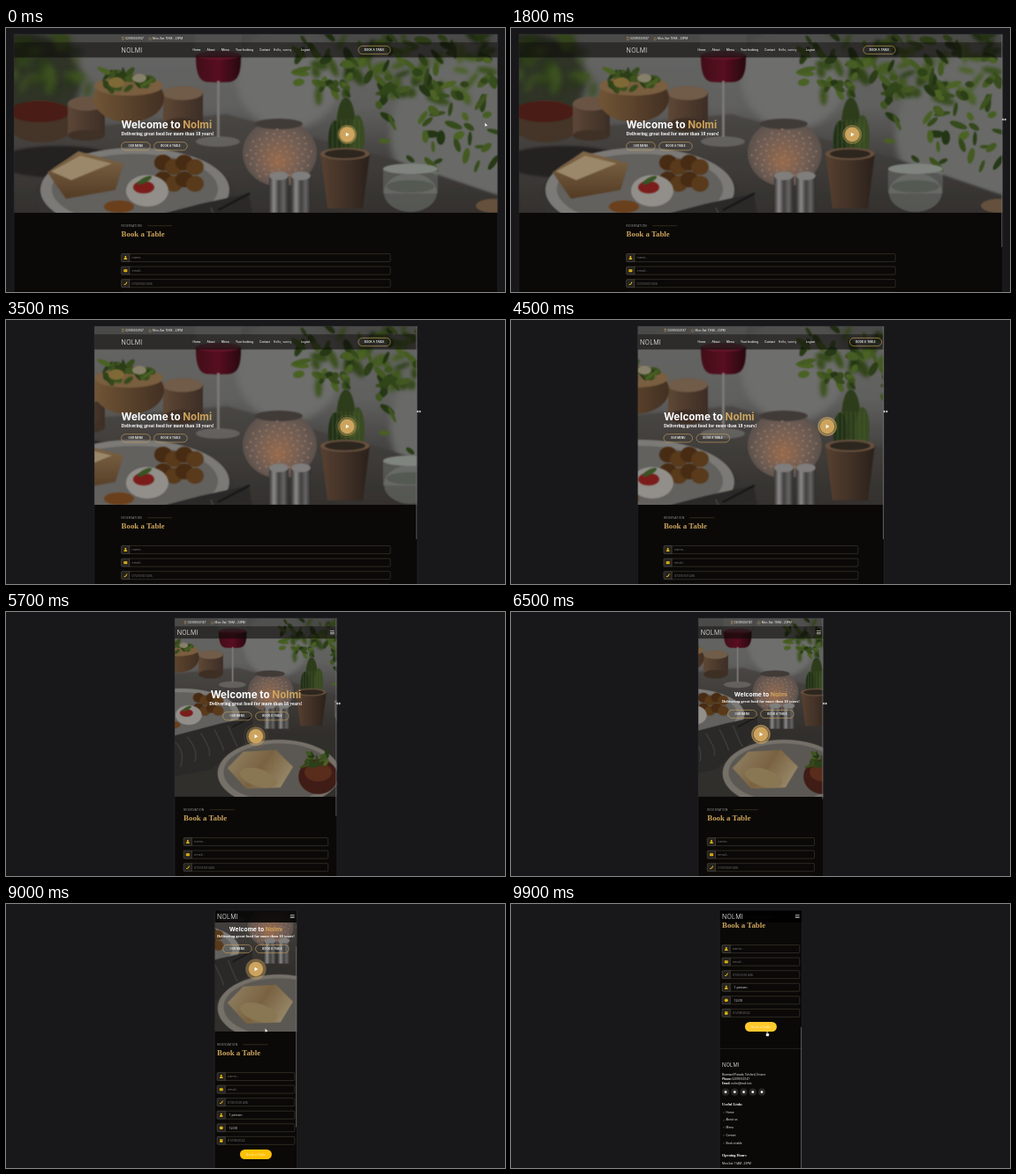
Recreate the animation shown at these times as an HTML page with a canvas. Size 565x300 px, loop 10 s.

```html
<!DOCTYPE html>
<html lang="en">
<head>
<meta charset="utf-8">
<title>Responsive restaurant page</title>
<style>
html, body { margin: 0; width: 100%; height: 100%; overflow: hidden; background: #18181b; }
canvas { display: block; width: 565px; height: 300px; }
</style>
</head>
<body>
<canvas id="stage"></canvas>
<script>
const W = 565, H = 300, LOOP = 10000, STEP = 100;
const PX = 0.235;              // stage pixels per page pixel
const CX = 282.9, TOP = 7, FOLD = 210, VIEW_H = 326;
const GOLD = '#cda45e', YELLOW = '#f5c211', DARK = '#0a0907';
const SANS = 'Inter, sans-serif', OPEN = '"Open Sans", sans-serif';
const SERIF = '"Liberation Serif", serif';
const NAME = 'Nolmi', HOURS = 'Mon-Sat: 11AM - 23PM', PHONE = '02095550147';

const canvas = document.getElementById('stage');
const dpr = window.devicePixelRatio || 1;
canvas.width = W * dpr;
canvas.height = H * dpr;
const ctx = canvas.getContext('2d');

function track(t, keys) {
  if (t <= keys[0][0]) return keys[0][1];
  for (let i = 1; i < keys.length; i++) {
    const [t0, a] = keys[i - 1], [t1, b] = keys[i];
    if (t <= t1) return a + (b - a) * (t - t0) / (t1 - t0);
  }
  return keys[keys.length - 1][1];
}

function random(seed) {
  return () => (seed = (seed * 16807) % 2147483647) / 2147483647;
}

// ---- basic shapes ----
function ellipse(c, x, y, rx, ry, fill, turn = 0) {
  c.fillStyle = fill;
  c.beginPath();
  c.ellipse(x, y, rx, ry, turn, 0, 7);
  c.fill();
}

function rect(x, y, w, h, fill) {
  ctx.fillStyle = fill;
  ctx.fillRect(x, y, w, h);
}

function box(x, y, w, h, r, stroke, fill, lw = 0.5) {
  ctx.beginPath();
  ctx.roundRect(x, y, w, h, r);
  if (fill) { ctx.fillStyle = fill; ctx.fill(); }
  if (stroke) { ctx.strokeStyle = stroke; ctx.lineWidth = lw; ctx.stroke(); }
}

function poly(c, points, fill) {
  c.fillStyle = fill;
  c.beginPath();
  points.forEach(([x, y]) => c.lineTo(x, y));
  c.fill();
}

function setFont(size, o) {
  ctx.font = `${o.weight || 400} ${size}px ${o.font || SANS}`;
  ctx.letterSpacing = (o.gap || 0) + 'px';
}

function text(s, x, y, size, o = {}) {
  setFont(size, o);
  ctx.fillStyle = o.color || '#fff';
  ctx.textAlign = o.align || 'left';
  ctx.fillText(s, x, y + size * 0.36);
  return ctx.measureText(s).width;
}

// ---- hero photo, reduced to soft shapes ----
const PHOTO_W = 548, PHOTO_H = 328;
const photo = makePhoto();

function makePhoto() {
  const cv = document.createElement('canvas'), k = 2;
  cv.width = PHOTO_W * k;
  cv.height = PHOTO_H * k;
  const c = cv.getContext('2d');
  c.scale(k, k);
  c.translate(-9, -TOP);
  const rnd = random(77);
  const e = (...a) => ellipse(c, ...a);
  const grad = (x0, y0, x1, y1, ...cols) => {
    const g = c.createLinearGradient(x0, y0, x1, y1);
    cols.forEach((col, i) => g.addColorStop(i / (cols.length - 1), col));
    return g;
  };
  const blur = n => { c.filter = n ? `blur(${n * k}px)` : 'none'; };
  const leaves = (n, x, y, w, h, size) => {
    for (let i = 0; i < n; i++) {
      const v = rnd();
      e(x + rnd() * w, y + rnd() * h, size * (0.6 + rnd()), size * (0.3 + rnd() * 0.4),
        `rgb(${38 + v * 48},${58 + v * 55},${22 + v * 20})`, rnd() * 3);
    }
  };

  c.fillStyle = grad(0, 7, 0, 335, '#747473', '#6d6d6b', '#403d3b', '#292725', '#242220');
  c.fillRect(0, 0, 600, 340);
  blur(4);
  e(320, 55, 60, 60, '#7d7d7c');
  e(515, 120, 80, 85, '#777975');
  e(20, 60, 65, 55, '#353b2c');
  leaves(30, 9, 7, 85, 65, 8);
  blur(2);
  leaves(42, 350, 7, 200, 75, 9);
  blur(0.8);
  leaves(75, 330, 7, 225, 70, 7);
  leaves(44, 420, 60, 135, 100, 7);
  blur(1.2);
  poly(c, [[9, 120], [250, 98], [440, 150], [557, 190], [557, 335], [9, 335]], grad(0, 100, 0, 220, '#53504d', '#383532'));
  e(60, 152, 70, 18, '#292725');

  // wooden bowls
  blur(0.7);
  e(40, 106, 40, 24, '#4f3c2d');
  e(38, 95, 34, 12, '#542019');
  c.fillStyle = grad(68, 0, 112, 0, '#6b5140', '#45352a');
  c.fillRect(70, 86, 42, 36);
  e(91, 86, 21, 8, '#78604d');
  e(91, 122, 21, 6, '#49382b');
  c.fillStyle = grad(178, 0, 224, 0, '#6b513c', '#44332a');
  c.fillRect(178, 74, 45, 36);
  e(200, 110, 22, 8, '#47362a');
  e(200, 74, 23, 8, '#806853');
  e(139, 80, 40, 27, grad(100, 0, 178, 0, '#80603d', '#4c3727'));
  e(139, 66, 39, 11, '#8a6b48');
  leaves(24, 112, 49, 52, 20, 6);
  e(125, 62, 9, 6, '#91783e');
  e(151, 57, 8, 5, '#999177');

  // wine glass
  c.fillStyle = grad(215, 0, 266, 0, '#4a101c', '#641024', '#2d0912');
  c.beginPath();
  c.moveTo(215, 31);
  c.bezierCurveTo(215, 68, 228, 60, 239, 62);
  c.bezierCurveTo(253, 60, 267, 68, 266, 31);
  c.fill();
  e(240.5, 31, 25.5, 5, '#701a30');
  c.fillStyle = 'rgba(150,150,150,.28)';
  c.fillRect(214, 7, 53, 25);
  c.fillStyle = '#8b8785';
  c.fillRect(239, 60, 3, 64);
  e(240, 129, 25, 6, 'rgba(150,147,144,.5)');

  // lantern
  const lamp = c.createRadialGradient(308, 153, 3, 310, 141, 44);
  lamp.addColorStop(0, '#a97858');
  lamp.addColorStop(0.55, '#816b60');
  lamp.addColorStop(1, '#655b56');
  e(310, 142, 42, 38, lamp);
  e(309, 109, 27, 6, '#4a4340');
  for (let i = 0; i < 75; i++) {
    const a = i * 2.4, r = Math.sqrt(i / 75);
    e(310 + Math.cos(a) * 38 * r, 145 + Math.sin(a) * 31 * r, 1.2, 1, '#b58e72');
  }

  // cactus
  e(385, 114, 11, 35, '#33451f');
  e(373, 128, 8, 23, '#26381b');
  e(398, 124, 8, 25, '#405527');
  c.strokeStyle = '#5a6b3a';
  c.lineWidth = 0.7;
  for (let x = 370; x < 404; x += 5) {
    c.beginPath();
    c.moveTo(x, 104);
    c.lineTo(x, 146);
    c.stroke();
  }
  poly(c, [[356, 143], [412, 143], [404, 205], [364, 205]], grad(356, 0, 412, 0, '#634a38', '#4b382c', '#30251e'));
  e(384, 143, 28, 7, '#765c47');
  e(384, 143, 23, 5, '#332b22');

  // water glass
  e(458, 187, 30, 22, 'rgba(130,135,130,.55)');
  c.fillStyle = 'rgba(145,150,145,.4)';
  c.fillRect(427, 160, 62, 28);
  e(458, 160, 31, 6, '#929690');
  e(458, 180, 27, 7, '#60655d');
  e(552, 202, 20, 8, '#735b45');

  // plate with pastry, rice and croquettes
  e(146, 192, 112, 54, '#3d3b39');
  e(146, 184, 107, 48, '#8d8b87');
  e(146, 183, 94, 40, '#706e6b');
  poly(c, [[47, 164], [82, 140], [133, 154], [124, 184], [68, 194]], grad(0, 140, 0, 195, '#927653', '#5d4228'));
  poly(c, [[51, 163], [84, 145], [120, 154], [74, 173]], '#b09a78');
  for (let i = 0; i < 8; i++)
    e(178 + (i % 4) * 12, 153 + Math.floor(i / 4) * 19 + (i % 2) * 5, 10, 9, i % 2 ? '#65421f' : '#513116');
  e(160, 185, 24, 18, '#a6a39d');
  e(156, 181, 12, 7, '#8b211e');
  e(157, 173, 9, 3, '#405e29', -0.5);
  e(128, 203, 17, 7, '#79481f');
  for (let x = 298; x < 340; x += 25) {
    c.fillStyle = grad(x, 0, x + 22, 0, '#3c3b3b', '#a09e9c', '#4a4949', '#757371', '#333');
    c.fillRect(x, 168, 22, 42);
    e(x + 11, 168, 11, 5, '#918f8d');
  }

  // cloth, second plate
  poly(c, [[125, 225], [220, 200], [275, 188], [280, 222], [200, 285], [120, 300]], '#302f2e');
  c.strokeStyle = '#4b4948';
  c.lineWidth = 2;
  for (let i = 0; i < 5; i++) {
    c.beginPath();
    c.moveTo(132 + i * 25, 232 - i * 7);
    c.quadraticCurveTo(155 + i * 24, 250, 145 + i * 26, 280 - i * 10);
    c.stroke();
  }
  c.strokeStyle = '#171717';
  c.beginPath();
  c.moveTo(240, 207);
  c.lineTo(276, 188);
  c.stroke();
  e(325, 292, 112, 62, '#858078');
  e(325, 290, 101, 53, '#68645e');
  poly(c, [[231, 282], [260, 252], [320, 249], [351, 280], [328, 318], [265, 320]], grad(240, 250, 340, 320, '#a39170', '#8a704a', '#b1a17e'));
  e(288, 300, 35, 16, '#9c875f', 0.3);
  e(397, 298, 36, 32, '#482019');
  e(397, 290, 25, 17, '#65321f');
  leaves(24, 370, 255, 45, 23, 7);
  blur(0);
  return cv;
}

// ---- page parts ----
function layout(left) {
  const w = 2 * (CX - left);
  const rule = [[1400, 1320], [1200, 1140], [992, 960], [768, 720], [576, 540]]
    .find(([min]) => w >= min * PX);
  const outer = rule ? rule[1] * PX : w;
  return {
    left, right: left + w, w, outer,
    x: CX - outer / 2 + 12 * PX, cw: outer - 24 * PX,
    wide: w >= 992 * PX, tablet: w >= 768 * PX, fixedPhoto: w >= 1024 * PX
  };
}

function pill(x, y, w, h, label, fill) {
  box(x, y, w, h, h / 2, GOLD, fill, 0.6);
  text(label, x + w / 2, y + h / 2, 2.9, { weight: 600, align: 'center', gap: 0.12 });
}

function playButton(x, y, t) {
  ellipse(ctx, x, y, 11, 11, 'rgba(205,164,94,.42)');
  ellipse(ctx, x, y, 8.2, 8.2, GOLD);
  const p = (t % 2000) / 2000;
  ctx.strokeStyle = `rgba(205,164,94,${0.7 * (1 - p)})`;
  ctx.lineWidth = 1.1;
  ctx.beginPath();
  ctx.arc(x, y, 8.5 + 5.6 * p, 0, 7);
  ctx.stroke();
  poly(ctx, [[x - 1.4, y - 2.3], [x + 2.4, y], [x - 1.4, y + 2.3]], '#fff');
}

function hero(p, t) {
  ctx.save();
  ctx.beginPath();
  ctx.rect(p.left, TOP, p.w, FOLD - TOP);
  ctx.clip();
  const k = p.fixedPhoto ? 1 : (FOLD - TOP) / PHOTO_H;
  ctx.drawImage(photo, CX - PHOTO_W * k / 2, TOP, PHOTO_W * k, PHOTO_H * k);
  rect(p.left, TOP, p.w, FOLD - TOP, 'rgba(0,0,0,.12)');

  const size = p.tablet ? 11.6 : 6.8, y = p.wide ? 110 : 94;
  const head = { weight: 700 };
  setFont(size, head);
  const headW = ctx.measureText('Welcome to ' + NAME).width;
  const hx = p.wide ? p.x : CX - headW / 2;
  const first = text('Welcome to ', hx, y, size, head);
  text(NAME, hx + first, y, size, { weight: 700, color: GOLD });
  text('Delivering great food for more than 18 years!', p.wide ? p.x : CX,
    y + (p.tablet ? 9.7 : 7.2), p.tablet ? 5.45 : 4.55,
    { font: SERIF, weight: 700, align: p.wide ? 'left' : 'center' });
  const bx = p.wide ? p.x : CX - 37.3, by = y + (p.tablet ? 19.7 : 17.4);
  pill(bx, by, 32.6, 9.2, 'OUR MENU');
  pill(bx + 37, by, 37.6, 9.2, 'BOOK A TABLE');
  if (p.wide) playButton(CX + p.outer / 3, 121, t);
  else playButton(CX, p.tablet ? 141.3 : 139, t);
  ctx.restore();
}

function icon(kind, x, y) {
  ctx.fillStyle = ctx.strokeStyle = YELLOW;
  if (kind === 'person') {
    ellipse(ctx, x, y - 1, 1, 1, YELLOW);
    box(x - 1.8, y + 0.2, 3.6, 1.8, [1.2, 1.2, 0.3, 0.3], null, YELLOW);
  } else if (kind === 'mail') {
    box(x - 2, y - 1.5, 4, 3, 0.4, null, YELLOW);
    ctx.strokeStyle = '#302715';
    ctx.lineWidth = 0.35;
    ctx.beginPath();
    ctx.moveTo(x - 2, y - 0.9);
    ctx.lineTo(x, y + 0.4);
    ctx.lineTo(x + 2, y - 0.9);
    ctx.stroke();
  } else if (kind === 'phone') {
    ctx.lineWidth = 1;
    ctx.beginPath();
    ctx.moveTo(x - 1.7, y + 1.5);
    ctx.quadraticCurveTo(x + 1.4, y + 1.4, x + 1.6, y - 1.7);
    ctx.stroke();
  } else if (kind === 'clock') {
    ellipse(ctx, x, y, 1.9, 1.9, YELLOW);
    rect(x - 0.2, y - 1.1, 0.4, 1.4, '#302715');
  } else {
    box(x - 1.7, y - 1.6, 3.4, 3.5, 0.4, null, YELLOW);
    rect(x - 1.7, y - 0.8, 3.4, 0.3, '#302715');
  }
}

const FIELDS = [['person', 'name..'], ['mail', 'email..'], ['phone', '07255501436'],
  ['person', '1 person', 1], ['clock', '12:00', 1], ['date', '01/08/2022']];

function booking(p, t) {
  text('RESERVATION', p.x, 225, 3.05, { font: OPEN, color: '#aaa', gap: 0.36 });
  rect(p.x + 29.5, 224.7, 28, 0.4, 'rgba(205,164,94,.5)');
  text('Book a Table', p.x, 234, 8.8, { font: SERIF, weight: 700, color: GOLD });
  FIELDS.forEach(([kind, value, chosen], i) => {
    const y = 261.1 + i * 14.55;
    box(p.x, y - 4.5, 9.3, 9, [1, 0, 0, 1], '#777166', '#24221f', 0.4);
    box(p.x + 9.3, y - 4.5, p.cw - 9.3, 9, [0, 1, 1, 0], '#625b4b', DARK, 0.4);
    icon(kind, p.x + 4.7, y);
    text(value, p.x + (chosen ? 13.3 : 12), y, 3.7, { font: OPEN, color: chosen ? '#eee' : '#7a7a7a' });
  });
  box(CX - 18, 344, 36, 11, 5.5, null, t >= 9700 ? '#ffca2c' : '#ffc107');
  text('Book a Table', CX, 349.5, 3.8, { font: OPEN, align: 'center', color: '#fff0b8' });
}

function footer(p) {
  const { x } = p;
  rect(p.left, 374.5, p.w, 0.5, '#37332a');
  text(NAME.toUpperCase(), x, 392.5, 5.8, { weight: 300, gap: 0.15 });
  const info = { font: OPEN }, bold = { font: OPEN, weight: 700 };
  text('Bramwell Parade, Tolsford, Ervane', x, 403.5, 3.1, info);
  [['Phone: ', PHONE], ['Email: ', 'nolmi@mail.test']].forEach(([label, value], i) => {
    const y = 408.4 + i * 5, w = text(label, x, y, 3.1, bold);
    text(value, x + w, y, 3.1, info);
  });
  for (let i = 0; i < 5; i++) {
    ellipse(ctx, x + 4 + i * 10.25, 423.7, 4.1, 4.1, '#292724');
    ellipse(ctx, x + 4 + i * 10.25, 423.7, 1.4, 1.4, '#f3f3f3');
  }
  const title = { font: SERIF, weight: 700 };
  text('Useful Links', x, 437.5, 4.2, title);
  ['Home', 'About us', 'Menu', 'Contact', 'Book a table'].forEach((s, i) => {
    const y = 446.4 + i * 8.9;
    text('›', x + 1.3, y, 3.6, { color: GOLD });
    text(s, x + 4.6, y, 3.1, info);
  });
  text('Opening Hours', x, 495.8, 4.2, title);
  text(HOURS, x, 505, 3.1, info);
}

const NAV = [['Home', 216], ['About', 232], ['Menu', 248.3], ['Your booking', 270],
  ['Contact', 293], ['Logout', 339]];

function header(p, scroll) {
  const stuck = scroll > 100 * PX;
  const top = stuck ? TOP : TOP + 9.2, h = p.wide ? 17.3 : 14;
  if (!stuck) {
    rect(p.left, TOP, p.w, 9.2, 'rgba(12,11,9,.3)');
    const x = p.tablet ? p.x : CX - 34.7;
    ctx.strokeStyle = GOLD;
    ctx.lineWidth = 0.4;
    ctx.strokeRect(x + 1, 10.6, 1.7, 3);
    text(PHONE, x + 4.4, 12.2, 3.2);
    ctx.beginPath();
    ctx.arc(x + 32.5, 12.2, 1.4, 0, 7);
    ctx.stroke();
    text(HOURS, x + 35.5, 12.2, 3.15);
  }
  rect(p.left, top, p.w, h, stuck ? 'rgba(0,0,0,.85)' : 'rgba(12,11,9,.62)');
  const mid = top + (p.wide ? 8.8 : 7.1);
  // the bar's own container is fluid below 1200 page pixels
  const barX = p.w < 1200 * PX ? p.left + 2.8 : p.x;
  const barR = 2 * CX - barX;
  text(NAME.toUpperCase(), barX, mid, 7, { weight: 300, gap: 0.2 });
  if (p.wide) {
    NAV.forEach(([s, x]) => text(s, x, mid, 3.15, { weight: 500, align: 'center' }));
    text('Hello, sunny', 313, mid, 3.55, { font: OPEN, align: 'center' });
    pill(barR - 36.2, mid - 4.6, 36.2, 9.2, 'BOOK A TABLE');
  } else {
    for (let i = -1; i < 2; i++) rect(barR - 5, mid + i * 1.6 - 0.25, 4.8, 0.55, '#fff');
  }
}

function scrollbar(p, t, scroll) {
  const thumb = p.wide ? 242 : p.tablet ? 225 : 205.5;
  const y = TOP + scroll * thumb / VIEW_H;
  ctx.globalAlpha = track(t, [[0, 0], [500, 0.8], [1100, 0.8]]);
  box(p.right - 1.5, y, 1.1, thumb, 0.5, null, '#6d6d6d');
  ctx.globalAlpha = 1;
}

function cursor(t) {
  const x = track(t, [[0, 543], [1200, 557]]), y = track(t, [[0, 109], [1200, 104]]);
  if (t < 1200) return arrow(x, y);
  if (t < 7700) {
    const rx = 2 * CX - leftEdge(t) + 1.6;
    poly(ctx, [[rx - 2.6, 104], [rx - 0.9, 102.6], [rx - 0.9, 105.4]], '#eee');
    poly(ctx, [[rx + 2.6, 104], [rx + 0.9, 102.6], [rx + 0.9, 105.4]], '#eee');
    rect(rx - 1.4, 103.7, 2.8, 0.6, '#eee');
    return;
  }
  const cx = track(t, [[7700, 332], [8100, 299.5], [9700, 290]]);
  const cy = track(t, [[7700, 104], [8100, 138.5], [9700, 146]]);
  if (t < 9600) return arrow(cx, cy);
  box(cx - 0.4, cy - 1.2, 1, 4, 0.5, '#222', '#fff', 0.3);
  box(cx - 1.3, cy + 1, 3.5, 3.3, 1, '#222', '#fff', 0.3);
}

function arrow(x, y) {
  poly(ctx, [[x - 0.6, y - 1.2], [x - 0.6, y + 3.1], [x + 0.4, y + 2.2], [x + 2.2, y + 2]], '#fff');
}

function leftEdge(t) {
  return track(t, [[1900, 9], [2700, 54], [3000, 77.5], [4100, 127], [4500, 143.3],
    [5200, 170], [5700, 191], [6300, 206], [6500, 212], [7400, 232.5], [7600, 236.2]]);
}

function draw(t) {
  const p = layout(leftEdge(t));
  const scroll = track(t, [[8500, 0], [9000, 65], [9600, 185], [9900, 210]]);
  ctx.setTransform(dpr, 0, 0, dpr, 0, 0);
  rect(0, 0, W, H, '#18181b');
  ctx.save();
  ctx.beginPath();
  ctx.rect(p.left, TOP, p.w, H - TOP);
  ctx.clip();
  rect(p.left, TOP, p.w, H, DARK);
  ctx.save();
  ctx.translate(0, -scroll);
  hero(p, t);
  booking(p, t);
  footer(p);
  ctx.restore();
  header(p, scroll);
  scrollbar(p, t, scroll);
  ctx.restore();
  box(p.left, TOP, p.w, H, 0, '#303033', null, 0.4);
  cursor(t);
}

function loop(now) {
  draw(Math.floor((now % LOOP) / STEP) * STEP);
  requestAnimationFrame(loop);
}
draw(0);
requestAnimationFrame(loop);
</script>
</body>
</html>
```
